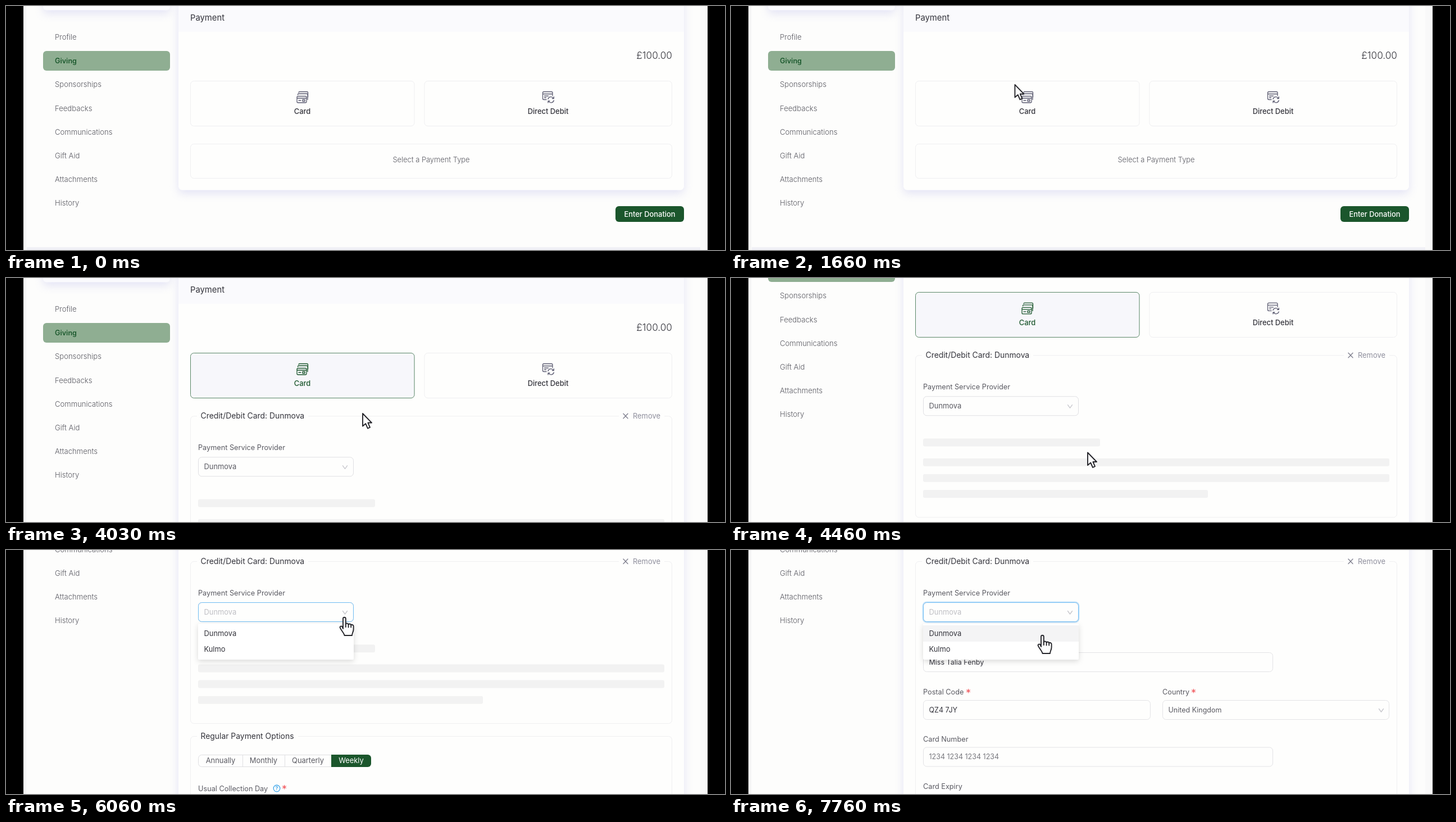
Recreate the animation shown at these times as an HTML page. Size 1280 px wide and 434 px high, loop 8000 ms.

```html
<!DOCTYPE html>
<html lang="en">
<head>
<meta charset="utf-8">
<title>Payment form</title>
<style>
html, body { margin: 0; width: 100%; height: 100%; overflow: hidden; background: #000; }
svg { display: block; width: 100%; height: 100%; }
text { font-family: Inter, "Open Sans", sans-serif; }
.raised { filter: drop-shadow(0 6px 8px rgba(190, 190, 235, .4)); }
.menu { filter: drop-shadow(0 3px 5px rgba(0, 0, 0, .14)); }
.icon { fill: none; stroke-width: 1.3; stroke-linecap: round; stroke-linejoin: round; }
.pointer { fill: #fff; stroke: #25252a; stroke-width: 1.9; stroke-linejoin: round; stroke-linecap: round; }
</style>
</head>
<body>
<svg id="stage" viewBox="0 0 1280 434" preserveAspectRatio="none"></svg>
<script>
const GREEN = '#1b562c', INK = '#33333b', SOFT = '#5a5a62', LINE = '#efeff1', PAPER = '#fefefd', TINT = '#fafafd';
const PROVIDER = 'Dunmova', OTHER_PROVIDER = 'Kulmo';

// Text is placed by the vertical middle of its capitals.
const text = (x, y, str, { size = 12.9, weight = 300, fill = SOFT, anchor = 'start' } = {}) =>
  `<text x="${x}" y="${y + size * .36}" font-size="${size}" font-weight="${weight}" fill="${fill}" text-anchor="${anchor}">${str}</text>`;
const rect = (x, y, w, h, fill, r = 0, extra = '') =>
  `<rect x="${x}" y="${y}" width="${w}" height="${h}" rx="${r}" fill="${fill}" ${extra}/>`;
const outline = (x, y, w, h, stroke = LINE, fill = 'none', extra = '') =>
  rect(x + .5, y + .5, w - 1, h - 1, fill, 6, `stroke="${stroke}" ${extra}`);
const path = (d, extra = '') => `<path d="${d}" ${extra}/>`;
const group = (id, body, extra = '') => `<g id="${id}" ${extra}>${body}</g>`;

const label = (x, y, str, starX) => text(x, y, str, { weight: 400, size: 12.7 }) +
  (starX ? text(starX, y + 2, '*', { size: 18, weight: 400, fill: '#f0555a' }) : '');
const field = (x, y, w, str, fill = INK) => outline(x, y, w, 35, '#e3e3e6') +
  text(x + 10.5, y + 17, str, { fill, weight: 400, size: 12.5 });
const chevron = (x, y) => path(`M${x - 4} ${y - 2.5}l4 5.5l4-5.5`, 'class="icon" stroke="#c6c6cb"');
const legend = (y, str, width) => rect(340, y - 4, width, 8, PAPER) + text(346.5, y, str, { size: 13.9, weight: 400, fill: INK });

const sidebar = ['Profile', 'Giving', 'Sponsorships', 'Feedbacks', 'Communications', 'Gift Aid', 'Attachments', 'History']
  .map((name, i) => text(87, 55.3 + i * 42.2, name,
    name === 'Giving' ? { weight: 600, fill: '#1d5a2f', size: 12.6 } : { weight: 350, size: 13.1 })).join('');

const cardIcon = path('M518 162.5a2 2 0 0 1 2-2h13a2 2 0 0 1 2 2v7.5a2 2 0 0 1-2 2h-13a2 2 0 0 1-2-2z' +
  'M518 164h17M521 168h4M528 166.5h4v3h-4zM519.5 158v-.5a1.5 1.5 0 0 1 1.5-1.5h14.5a1.5 1.5 0 0 1 1.5 1.5v9' +
  'M521 153.8a1.5 1.5 0 0 1 1.5-1.3h13.5a1.5 1.5 0 0 1 1.5 1.5v8', 'id="cardIcon" class="icon"');
const debitIcon = path('M962 166.5h-4.5a2 2 0 0 1-2-2v-10a2 2 0 0 1 2-2h13.5a2 2 0 0 1 2 2v5' +
  'M955.5 156.5h17.5M958.5 160h7M958.5 163h3' +
  'M965 165.5a5.3 5.3 0 0 1 9.5-1.5M975.3 161.5v3h-3M975.3 168a5.3 5.3 0 0 1-9.5 1.5M965 172v-3h3', 'class="icon" stroke="#5a5a70"');

const option = (x, w, id) => outline(x, 133, w, 81) +
  outline(x, 133, w, 81, '#5a8767', '#f7f7fb', `id="${id}" opacity="0"`);

const before = outline(328, 245, 858, 62) + text(757, 273.5, 'Select a Payment Type', { anchor: 'middle', size: 12.9, weight: 350 }) +
  rect(37, 429, 1199, 5, '#f1f1f6') + rect(1085, 356, 122, 28, GREEN, 6) +
  text(1146, 370, 'Enter Donation', { fill: '#fff', weight: 500, anchor: 'middle' });

const skeleton = [[168.3, 315], [203.5, 830], [231.6, 830], [259.8, 507]]
  .map(([y, w]) => rect(342, y, w, 14, '#f2f2f2', 3)).join('');

const segments = [['Annually', 382], ['Monthly', 458.5], ['Quarterly', 537.5], ['Weekly', 614.5]]
  .map(([name, x]) => text(x, 374.5, name, { anchor: 'middle', fill: name === 'Weekly' ? '#fff' : SOFT, weight: 400 })).join('');

const regular = outline(328, 331, 858, 300) + legend(331, 'Regular Payment Options', 180) +
  outline(342, 364, 308, 22, '#dfdfe2') + path('M421.5 364v21M496.5 364v21', 'stroke="#dfdfe2"') +
  path('M579 364h65a6 6 0 0 1 6 6v10a6 6 0 0 1-6 6h-65z', `fill="${GREEN}"`) + segments +
  label(342, 424, 'Usual Collection Day', 491) +
  '<circle cx="482" cy="424" r="5.8" fill="none" stroke="#2f9fe8" stroke-width="1.2"/>' +
  text(482, 424, '?', { size: 9, weight: 600, fill: '#2f9fe8', anchor: 'middle' });

const details = field(342, 182, 623, 'Miss Talia Fenby') +
  label(342, 252.5, 'Postal Code', 418) + field(342, 267, 405, 'QZ4 7JY') +
  label(768, 252.5, 'Country', 819) + field(768, 267, 404, 'United Kingdom', SOFT) + chevron(1157.5, 285);
const cardFields = label(342, 336.5, 'Card Number') + field(342, 350.5, 623, '1234 1234 1234 1234', '#77777d') +
  label(342, 420.5, 'Card Expiry');

const menu = rect(342, 131, 277, 64, '#fff', 2, 'class="menu"') + rect(342, 134, 277, 29, '#f4f4f5', 0, 'id="row0"') +
  rect(342, 163, 277, 28, '#f4f4f5', 0, 'id="row1"') +
  text(352.5, 148.5, PROVIDER, { fill: INK, weight: 400 }) + text(352.5, 176.5, OTHER_PROVIDER, { fill: INK, weight: 400 });

const after = group('short', outline(328, 20, 858, 289) + skeleton + regular) +
  group('tall', outline(328, 20, 858, 600) + details + group('cardFields', cardFields)) +
  legend(20, `Credit/Debit Card: ${PROVIDER}`, 198) + rect(1091, 16, 81, 8, PAPER) +
  path('M1099 16l8 8.5M1107 16l-8 8.5', 'class="icon" stroke="#7d7d8c"') + text(1116, 20, 'Remove', { fill: '#8f8f9d', weight: 400 }) +
  label(342, 76.5, 'Payment Service Provider') +
  rect(341.5, 92.5, 278, 36, 'none', 7, 'id="ring" stroke="#c4e3fb" stroke-width="2"') +
  outline(342, 93, 277, 35, '#e0e0e3', PAPER) + outline(342, 93, 277, 35, '#6fbcf3', 'none', 'id="focus"') +
  group('choice', text(352.5, 110, PROVIDER, { fill: 'currentColor', weight: 400 })) + chevron(603.5, 111) + group('menu', menu);

stage.innerHTML = rect(31, 0, 1218, 434, '#f9f9f9') + rect(37, 0, 1199, 434, '#fdfdfc') +
  group('page',
    rect(66, -60, 226, 67.5, TINT, 6, 'class="raised"') + rect(66, 80, 226, 35, '#8fae92', 6) + sidebar +
    rect(307, -40, 900, 367.5, PAPER, 7, 'id="panel" class="raised"') + rect(307, -40, 900, 86, TINT) +
    text(328, 21, 'Payment', { size: 14.8, weight: 400, fill: INK }) +
    text(1186, 88, '£100.00', { size: 17.2, anchor: 'end', fill: INK }) +
    option(328, 399.5, 'cardHover') + option(744.5, 441.5, 'debitHover') +
    group('cardLabel', cardIcon + text(527.5, 187, 'Card', { weight: 500, anchor: 'middle', fill: 'currentColor' })) +
    debitIcon + text(965, 187, 'Direct Debit', { weight: 500, anchor: 'middle', fill: INK }) +
    group('before', before) + group('after', after, 'transform="translate(0 225.3)"')) +
  rect(0, 0, 31, 434, '#000') + rect(1249, 0, 31, 434, '#000') +
  group('cursor',
    path('M1 1.5V24L6.3 19.5L10 28L14 26.2L10.4 18H17Z', 'id="arrow" class="pointer"') +
    group('hand', path('M-2 21V3.2a2.4 2.4 0 0 1 4.8 0V13c0-2 4.6-2 4.8.6c.6-1.8 4.4-1.4 4.6 1c.8-1.4 4.2-.8 4.4 1.8V22' +
      'c0 5-2.4 6-2.6 11H.5c-.4-3.4-5-8-7.6-13.4c-1.2-2.6 1.8-4.2 3.6-2.2z') +
      path('M2.8 13v5M7.6 13.6v5M12.2 14.6v4', 'fill="none"'), 'class="pointer"'));

// Pointer path: time, x, y
const trail = [
  [500, 521, -28], [780, 440, 84], [1020, 320, 60], [1310, 362, 6], [1660, 504, 138], [1830, 576, 213],
  [2260, 576, 213], [2530, 790, 185], [2830, 634, 168], [3960, 634, 168], [4100, 634, 309],
  [5030, 634, 309], [5830, 602, 119], [6120, 602, 119], [6630, 582, 146], [6730, 582, 146],
  [7150, 560, 172], [7530, 548, 166], [7760, 554, 151], [8000, 554, 151]];

const $ = id => document.getElementById(id);
const ramp = (t, a, b) => Math.min(1, Math.max(0, (t - a) / (b - a)));
const show = (id, on) => $(id).setAttribute('opacity', +on);
const move = (id, x, y) => $(id).setAttribute('transform', `translate(${x} ${y})`);

function pointerAt(t) {
  const i = Math.max(1, trail.findIndex(p => p[0] > t));
  const [a, b] = [trail[i - 1], trail[i]], p = ramp(t, a[0], b[0]);
  return [a[1] + (b[1] - a[1]) * p, a[2] + (b[2] - a[2]) * p];
}

function draw(t) {
  const chosen = t >= 3260, loaded = t >= 6500, open = ramp(t, 5870, 6040);
  const [x, y] = pointerAt(t);
  move('cursor', x, y);
  show('cursor', t >= 500);
  const hand = (t >= 1690 && t < 3975) || (t > 5030 && y < 128) || t > 5830;
  show('hand', hand);
  show('arrow', !hand);

  move('page', 0, -225.3 * (1 - (1 - ramp(t, 4345, 4800)) ** 2.22));
  show('cardHover', ramp(t, 1680, 1810) - ramp(t, 2430, 2540) + ramp(t, 2660, 2810));
  show('debitHover', ramp(t, 2440, 2540) - ramp(t, 2640, 2760));
  $('cardLabel').setAttribute('color', chosen ? GREEN : INK);
  $('cardIcon').setAttribute('stroke', chosen ? GREEN : '#5a5a70');
  $('panel').setAttribute('height', chosen ? 1000 : 367.5);
  show('before', !chosen);
  show('after', chosen);

  show('focus', ramp(t, 5780, 5860));
  show('ring', ramp(t, 6070, 6300));
  $('choice').setAttribute('color', open ? '#bfbfc4' : SOFT);
  $('menu').setAttribute('transform', `translate(0 ${26 * (1 - open)}) scale(1 ${.8 + .2 * open})`);
  show('menu', open);
  show('row0', t > 6300 && y < 163);
  show('row1', t > 6300 && y >= 163);
  show('short', !loaded);
  show('tall', loaded);
  show('cardFields', t >= 6850);
}

const start = performance.now();
(function frame() {
  draw((performance.now() - start) % 8000);
  requestAnimationFrame(frame);
})();
</script>
</body>
</html>
```
